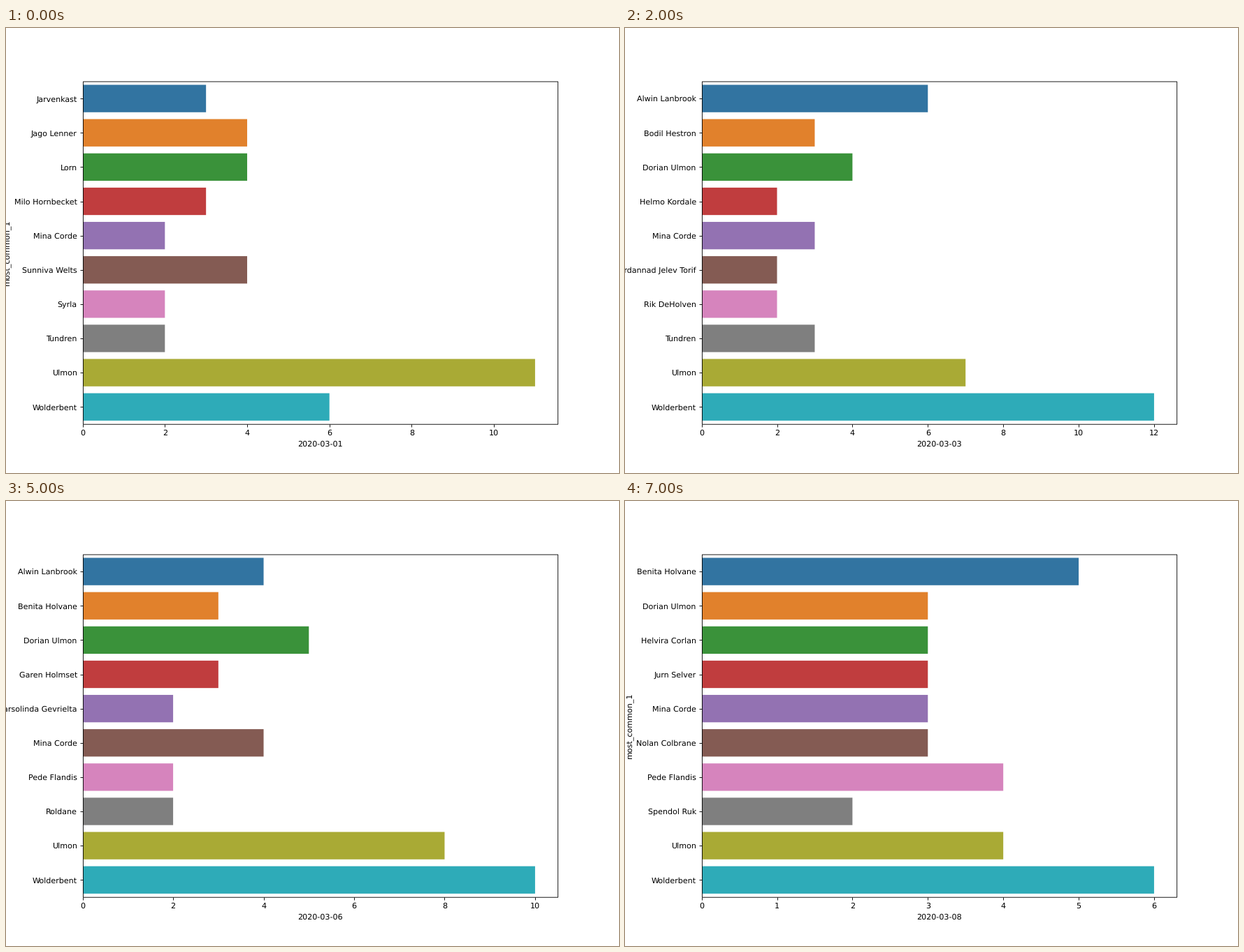
A matplotlib script for the animation above (8 s loop, 877 by 638 pixels).

```python
import matplotlib.pyplot as plt
from matplotlib.animation import FuncAnimation
from matplotlib.patches import Rectangle

WIDTH, HEIGHT, DPI = 877, 638, 80

COLORS = ["#3274a1", "#e1812c", "#3a923a", "#c03d3e", "#9372b2",
          "#845b53", "#d684bd", "#7f7f7f", "#a9aa35", "#2eabb8"]

# One dict of mention counts per day.
DAYS = [
    {"Jarvenkast": 3, "Jago Lenner": 4, "Lorn": 4, "Milo Hornbecket": 3,
     "Mina Corde": 2, "Sunniva Welts": 4, "Syrla": 2, "Tundren": 2,
     "Ulmon": 11, "Wolderbent": 6},
    {"Ada Velin": 2, "Alwin Lanbrook": 8, "Andreth Solve": 2,
     "Bril Harvane": 2, "Bodil Hestron": 2, "Dorian Ulmon": 5, "Felmo": 3,
     "Rik DeHolven": 11, "Ulmon": 8, "Wolderbent": 23},
    {"Alwin Lanbrook": 6, "Bodil Hestron": 3, "Dorian Ulmon": 4,
     "Helmo Kordale": 2, "Mina Corde": 3, "Mordannad Jelev Torif": 2,
     "Rik DeHolven": 2, "Tundren": 3, "Ulmon": 7, "Wolderbent": 12},
    {"Bardolmin Nestoyavu": 2, "Dorian Ulmon": 5, "Idma Rolde": 2,
     "Karsolinda Gevrielta": 3, "Mordannad Jelev Torif": 4,
     "Orsel Madrin": 2, "Roldane": 4, "Selto Mav": 2, "Tundren": 3,
     "Wolderbent": 11},
    {"Bril da Helso": 4, "Dorian Ulmon": 7, "Garen Holmset": 4,
     "Helmo Kordale": 3, "Jun Bodel": 6, "Rodrin Velmarsh": 6, "Tundren": 6,
     "Ulmon": 9, "Wolderbent": 7, "Xe Lindre": 3},
    {"Alwin Lanbrook": 4, "Benita Holvane": 3, "Dorian Ulmon": 5,
     "Garen Holmset": 3, "Karsolinda Gevrielta": 2, "Mina Corde": 4,
     "Pede Flandis": 2, "Roldane": 2, "Ulmon": 8, "Wolderbent": 10},
    {"Alwin Lanbrook": 5, "Dorian Ulmon": 7, "Jua Relk": 2,
     "Lanter Pelt": 3, "Lundeb": 2, "Meltane": 2, "Pede Flandis": 2,
     "Rik DeHolven": 3, "Roldane": 2, "Ulmon": 13},
    {"Benita Holvane": 5, "Dorian Ulmon": 3, "Helvira Corlan": 3,
     "Jurn Selver": 3, "Mina Corde": 3, "Nolan Colbrane": 3,
     "Pede Flandis": 4, "Spendol Ruk": 2, "Ulmon": 4, "Wolderbent": 6},
]

plt.rcParams.update({"font.family": "DejaVu Sans", "font.size": 10,
                     "text.hinting": "none"})
fig, ax = plt.subplots(figsize=(WIDTH / DPI, HEIGHT / DPI), dpi=DPI)

# The frame sits a fraction of a pixel right of and below the axes box.
fig.add_artist(Rectangle((138.5 / 1100, 87.5 / 800), 852 / 1100, 616 / 800,
                         fill=False, edgecolor="black", linewidth=0.8,
                         snap=False))


def draw_day(i):
    counts = DAYS[i]
    rows = range(len(counts))
    ax.clear()
    ax.spines[:].set_visible(False)
    ax.barh(rows, list(counts.values()), height=0.8, color=COLORS, snap=False)
    ax.set_yticks(rows, list(counts))
    ax.set_ylim(len(counts) - 0.5, -0.5)
    ax.set_xlim(0, max(counts.values()) * 1.05)
    ax.set_xlabel(f"2020-03-{i + 1:02d}", labelpad=4.7)
    ax.set_ylabel("most_common_1")


anim = FuncAnimation(fig, draw_day, frames=len(DAYS), interval=1000,
                     repeat=True, repeat_delay=0)
plt.show()
```
